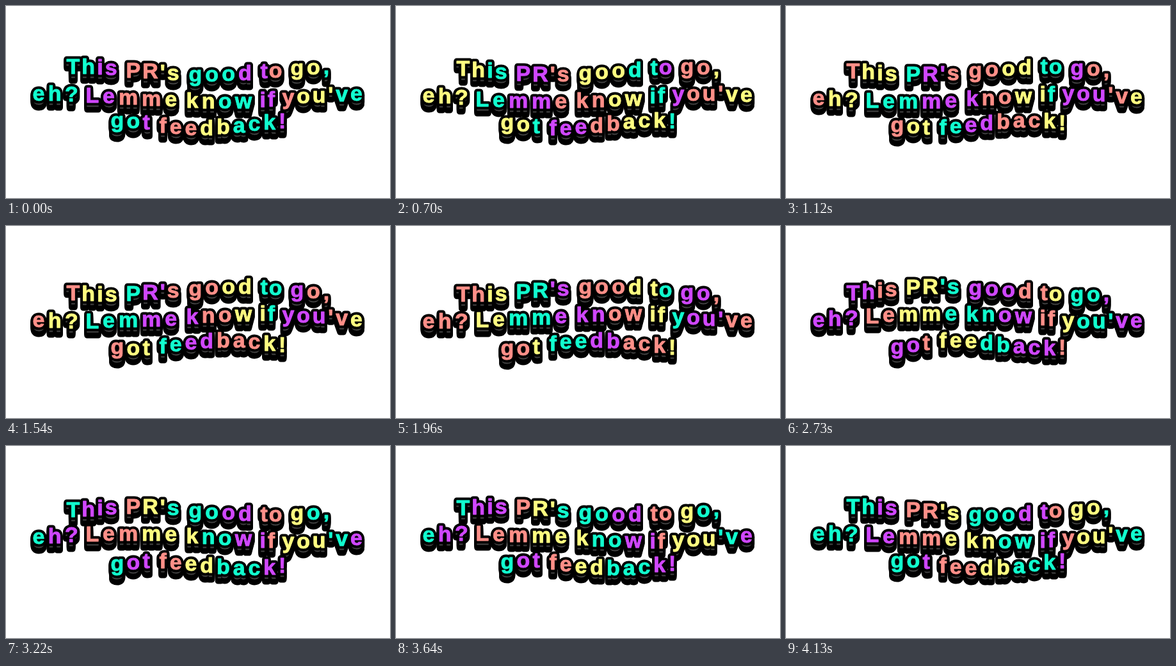
Recreate the animation shown at these times as an HTML page with a canvas. Size 600 by 300 pixels, loop 4.2 s.

```html
<!DOCTYPE html>
<html lang="en">
<head>
<meta charset="utf-8">
<title>Wavy text</title>
<style>
html, body { margin: 0; width: 100%; height: 100%; overflow: hidden; background: #fff; }
canvas { display: block; }
</style>
</head>
<body>
<canvas id="stage" width="600" height="300"></canvas>
<script>
const ctx = document.getElementById('stage').getContext('2d');
const LOOP = 4200, STEP = 70, SWELL = 6;
const DEPTH = 11, GLINT = 6, FACE = 0.9, EDGE = 9;
const COLORS = ['#11ffcf', '#d047ff', '#ff8f88', '#fffd80'];

// Each word: text, left edge, letter spacing, colour phase of each letter in eighths of the loop
const LINES = [
  { y: 112, words: [['This', 94, 3.1, '0122'], ["PR's", 189, 3, '4567'], ['good', 286, 5.1, '0012'],
                    ['to', 397, 2, '34'], ['go,', 445, 4.9, '670']] },
  { y: 154, words: [['eh?', 42, 5.4, '011'], ['Lemme', 126, 5.9, '33456'], ['know', 283, 5.3, '6701'],
                    ['if', 398, 2.9, '23'], ["you've", 431, 3.8, '566701']] },
  { y: 196, words: [['got', 164, 4.2, '012'], ['feedback!', 239, 4.9, '445670012']] }
];

ctx.font = 'bold 34px "Liberation Sans", Arial, sans-serif';
ctx.lineJoin = ctx.lineCap = 'round';

function layOut({ y, words }) {
  const letters = [];
  let index = 0;
  for (const [text, left, gap, phases] of words) {
    let x = left + FACE / 2 + ctx.measureText(text[0]).actualBoundingBoxLeft;
    [...text].forEach((char, i) => {
      letters.push({ char, x, y, index: index++, phase: +phases[i] });
      x += ctx.measureText(char).width + gap;
    });
    index++; // the space
  }
  const count = index - 1;
  for (const l of letters) l.turn = l.index / count;
  return letters;
}

const lines = LINES.map(layOut);

function paint(char, x, y, color, width) {
  ctx.fillStyle = ctx.strokeStyle = color;
  ctx.lineWidth = width;
  ctx.strokeText(char, x, y);
  ctx.fillText(char, x, y);
}

function draw(time) {
  const t = Math.floor(time % LOOP / STEP) * STEP;
  ctx.fillStyle = '#fff';
  ctx.fillRect(0, 0, 600, 300);
  for (const letters of lines) {
    const each = (dy, width, color) => {
      for (const l of letters) {
        const y = l.y - SWELL * Math.cos(2 * Math.PI * (l.turn + t / LOOP));
        paint(l.char, l.x, y + dy, color(l), width);
      }
    };
    const black = () => '#000';
    for (let dy = DEPTH; dy > 0; dy -= 2) each(dy, EDGE, black);
    each(GLINT, FACE, () => '#444');
    each(0, EDGE, black);
    each(0, FACE, l => {
      const c = Math.floor(l.phase / 2 - (t - STEP / 2) * 4 / LOOP);
      return COLORS[(c % 4 + 4) % 4];
    });
  }
}

const start = performance.now();
function tick() {
  draw(performance.now() - start);
  requestAnimationFrame(tick);
}
tick();
</script>
</body>
</html>
```
